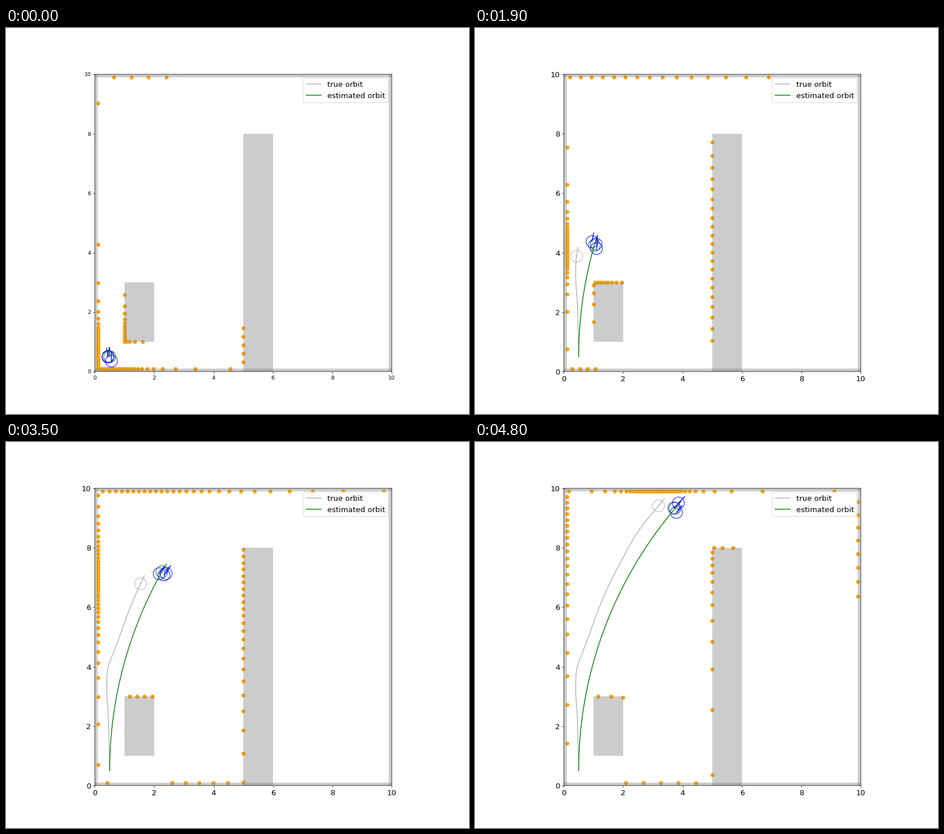
Write a matplotlib script that moves like this. It is 820 px wide and 683 px high and loops after 4.9 s.

```python
import numpy as np
import matplotlib.pyplot as plt
from matplotlib.animation import FuncAnimation
from matplotlib.patches import Circle, Rectangle

FRAMES, INTERVAL = 49, 100
W, H, DPI = 820, 683, 64
U = W / 12 / DPI  # sizes below are meant for a 12 inch wide figure

plt.rcParams.update({
    "font.family": "DejaVu Sans",
    "font.size": 10 * U,
    "axes.linewidth": 0.8 * U,
    "lines.linewidth": 1.5 * U,
    "patch.linewidth": 1.0 * U,
    "path.snap": False,
    **{f"{a}tick.major.{k}": v * U for a in "xy"
       for k, v in (("size", 3.5), ("width", 0.8), ("pad", 3.5))},
})

# Map: x, y, width, height
WALLS = [(0, 0, 10, 0.1), (0, 9.9, 10, 0.1), (0, 0, 0.1, 10), (9.9, 0, 0.1, 10)]
BLOCKS = [(1, 1, 1, 2), (5, 0, 1, 8)]
RECTS = np.array(WALLS + BLOCKS, float)
RAYS = np.linspace(-np.pi, np.pi, 100)
RADIUS, NOSE, SPREAD = 0.2, 0.3, 0.09

# Waypoints of the true orbit: step, x, y, lead of the scanner
WAY = np.array([
    (0, 0.50, 0.50, 0.25),
    (7, 0.46, 2.17, 0.135),
    (15, 0.40, 3.37, 0.25),
    (20, 0.46, 4.02, 0.29),
    (24, 0.71, 4.68, 0.32),
    (31, 1.26, 6.16, 0.23),
    (39, 1.88, 7.45, 0.115),
    (44, 2.52, 8.58, 0.02),
    (48, 3.19, 9.41, -0.105),
])


def smooth(t, knots, values):
    """Cubic Hermite curve through the knots."""
    slope = np.gradient(values, knots)
    k = np.clip(np.searchsorted(knots, t, side="right") - 1, 0, len(knots) - 2)
    h = knots[k + 1] - knots[k]
    u = (t - knots[k]) / h
    ease = u * u * (3 - 2 * u)
    bend = u * (1 - u) * ((1 - u) * slope[k] - u * slope[k + 1])
    return values[k] + (values[k + 1] - values[k]) * ease + h * bend


steps = np.arange(FRAMES)
true_x, true_y = (smooth(steps, WAY[:, 0], WAY[:, c]) for c in (1, 2))
true_head = np.arctan2(np.gradient(true_y), np.gradient(true_x))
lead = np.interp(steps, WAY[:, 0], WAY[:, 3])
scan_x = true_x + lead * np.cos(true_head)
scan_y = true_y + lead * np.sin(true_head)

# Estimated orbit: constant speed and turn rate
SPEED, TURN = 0.2, 0.0147
est_head = np.pi / 2 - TURN * steps
est_x = 0.5 + SPEED / TURN * (1 - np.sin(est_head))
est_y = 0.5 + SPEED / TURN * np.cos(est_head)

# Noisy samples around the estimate: x, y, heading
noise = np.random.default_rng(4).normal(0, SPREAD, (FRAMES, 3, 3))


def scan(x, y):
    """Nearest hit of every ray with the rectangles of the map."""
    ray = np.column_stack([np.cos(RAYS), np.sin(RAYS)])[:, None]
    pos = np.array([x, y])
    lo = (RECTS[:, :2] - pos) / ray
    hi = (RECTS[:, :2] + RECTS[:, 2:] - pos) / ray
    near = np.minimum(lo, hi).max(axis=2)
    far = np.maximum(lo, hi).min(axis=2)
    dist = np.where((near <= far) & (near > 0), near, np.inf).min(axis=1)
    return pos + ray[:, 0] * dist[:, None]


class Robot:
    def __init__(self, color, alpha=1):
        self.body = ax.add_patch(Circle((0, 0), RADIUS, fill=False, ec=color, alpha=alpha))
        self.nose, = ax.plot([], [], color=color, alpha=alpha)

    def place(self, x, y, head):
        self.body.center = x, y
        self.nose.set_data([x, x + NOSE * np.cos(head)], [y, y + NOSE * np.sin(head)])


fig, ax = plt.subplots(figsize=(W / DPI, H / DPI), dpi=DPI)
ax.set_aspect("equal")
ax.set(xlim=(0, 10), ylim=(0, 10), xticks=range(0, 11, 2), yticks=range(0, 11, 2))

dots = ax.scatter([], [], s=36 * U**2, color="orange", linewidths=1.5 * U)
for rx, ry, rw, rh in RECTS:
    ax.add_patch(Rectangle((rx, ry), rw, rh, color="gray", alpha=0.4, lw=0))

true_line, = ax.plot([], [], color="gray", alpha=0.6, label="true orbit")
est_line, = ax.plot([], [], color="green", label="estimated orbit")
true_bot = Robot("gray", 0.6)
est_bot = Robot("green")
samples = [Robot("blue") for _ in range(3)]
ax.legend(loc="upper right", fontsize=14 * U)


def update(i):
    ax.tick_params(labelsize=(14 if i else 10) * U)
    dots.set_offsets(scan(scan_x[i], scan_y[i]))
    true_line.set_data(true_x[:i + 1], true_y[:i + 1])
    est_line.set_data(est_x[:i + 1], est_y[:i + 1])
    true_bot.place(true_x[i], true_y[i], true_head[i])
    est = np.array([est_x[i], est_y[i], est_head[i]])
    est_bot.place(*est)
    for bot, shift in zip(samples, noise[i]):
        bot.place(*(est + shift))
    return []


anim = FuncAnimation(fig, update, frames=FRAMES, interval=INTERVAL, repeat=True, repeat_delay=0)
plt.show()
```
